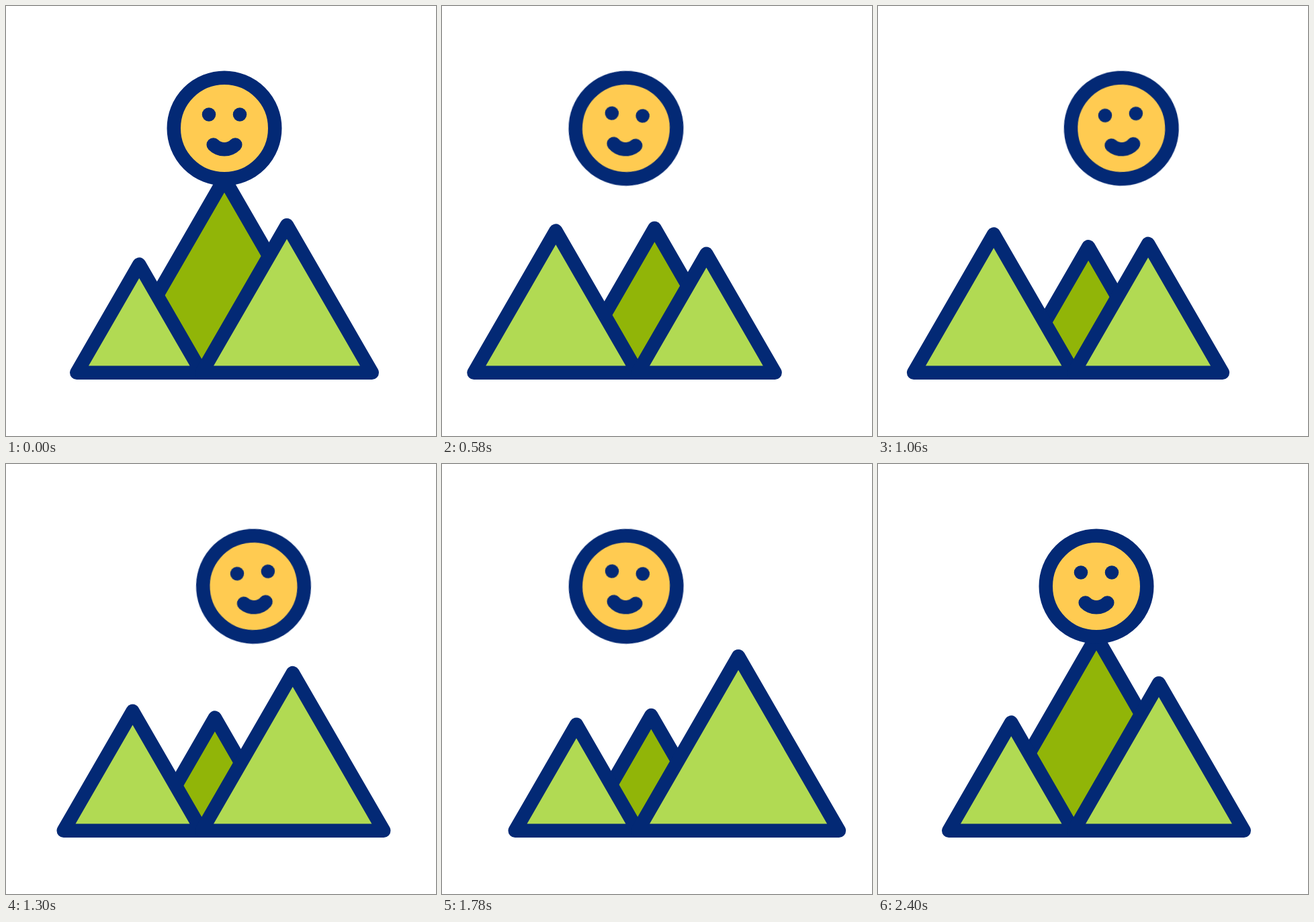
These frames come from a looping animation (640x640 px, 2420 ms). An HTML page without scripts:

```html
<!DOCTYPE html>
<html lang="en">
<head>
<meta charset="utf-8">
<title>Sun over mountains</title>
<style>
  html, body { margin: 0; width: 100%; height: 100%; overflow: hidden; background: #fff; }
  svg { display: block; width: 100vw; height: 100vh; }

  .ink { stroke: #032975; stroke-width: 20.5; stroke-linecap: round; stroke-linejoin: round; }
  .eye { fill: #032975; }

  .back, .left, .right, .sun {
    animation: 2420ms cubic-bezier(.3333, 0, .6667, 1) infinite;
  }
  .back { fill: #91b508; animation-name: back; }
  .left { fill: #b1da53; animation-name: left; }
  .right { fill: #b1da53; animation-name: right; }
  .sun { animation-name: sway; }

  /* Peaks share a foot at 0,0; poses fall at 0, 800, 1600 and 2400 ms, then a short hold. */
  @keyframes back {
    0%, 99.174%, 100% { d: path("M-132.95 0L200.45 0L33.75 -288.75Z"); }
    33.058% { d: path("M-91.4 0L137.8 0L23.2 -198.5Z"); }
    66.116% { d: path("M-71 0L107 0L18 -154.2Z"); }
  }
  @keyframes left {
    0%, 99.174%, 100% { d: path("M0 0L-186 0L-93 -161.1Z"); }
    33.058% { d: path("M0 0L-256.8 0L-128.4 -222.4Z"); }
    66.116% { d: path("M0 0L-182 0L-91 -157.6Z"); }
  }
  @keyframes right {
    0%, 99.174%, 100% { d: path("M0 0L253.5 0L126.75 -219.5Z"); }
    33.058% { d: path("M0 0L193.3 0L96.65 -167.4Z"); }
    66.116% { d: path("M0 0L306.6 0L153.3 -265.5Z"); }
  }
  @keyframes sway {
    0%, 99.174%, 100% { transform: translateX(0) rotate(0deg); }
    24.793%, 74.38% { transform: translateX(-51.2px) rotate(5deg); }
    49.587% { transform: translateX(51.2px) rotate(-5deg); }
  }
</style>
</head>
<body>
<svg viewBox="0 0 640 640">
  <g class="ink" transform="translate(291.25 545.75)">
    <path class="back" d="M-132.95 0L200.45 0L33.75 -288.75Z"/>
    <path class="left" d="M0 0L-186 0L-93 -161.1Z"/>
    <path class="right" d="M0 0L253.5 0L126.75 -219.5Z"/>
  </g>
  <g transform="translate(325 182)">
    <g class="sun">
      <circle class="ink" r="75.25" fill="#ffcb51"/>
      <circle class="eye" cx="-23" cy="-20.5" r="10.25"/>
      <circle class="eye" cx="23" cy="-20.5" r="10.25"/>
      <path class="ink" fill="none" d="M-16.3 24.4A23.05 23.05 0 0 0 16.3 24.4"/>
    </g>
  </g>
</svg>
</body>
</html>
```
